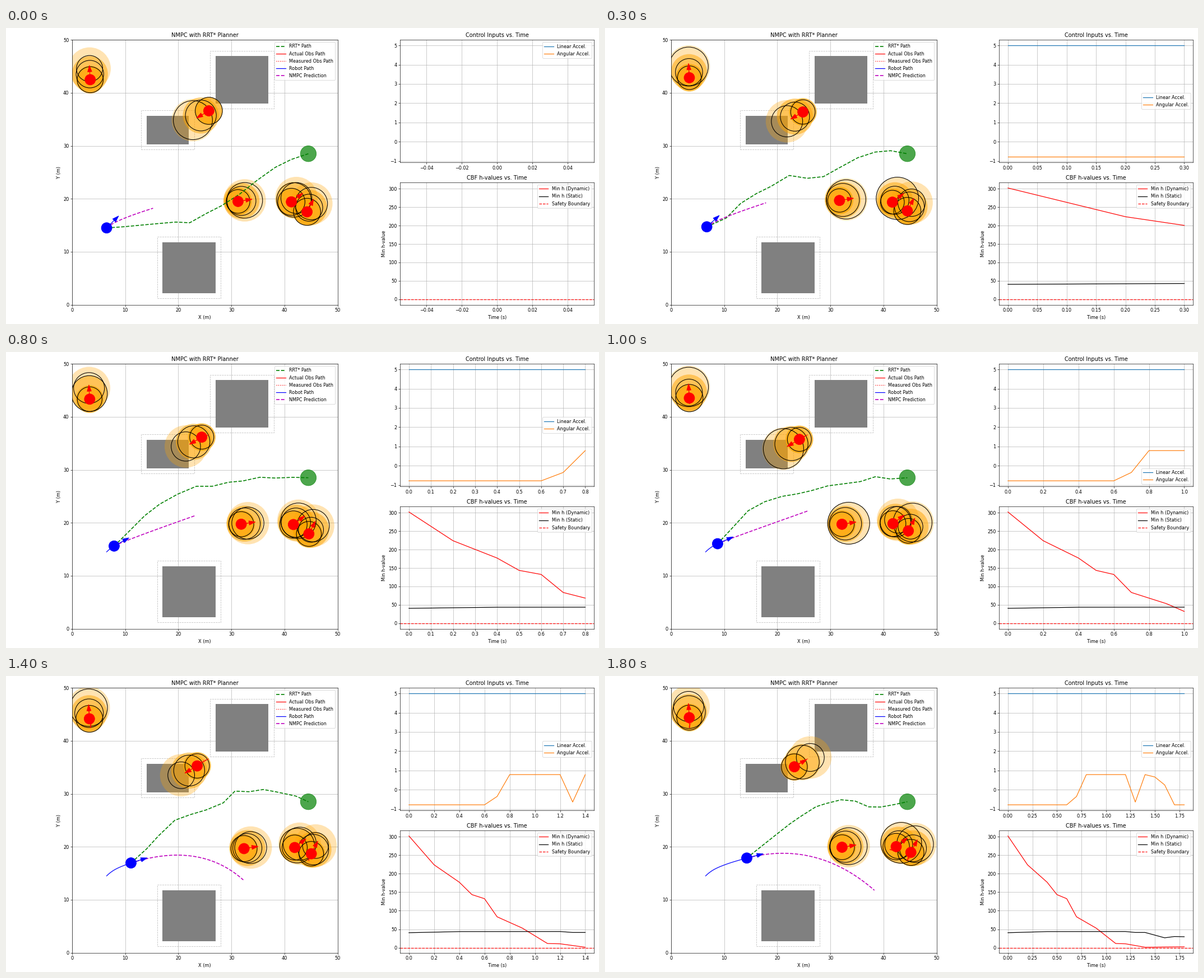
A matplotlib script for the animation above (1.9 s loop, 1058x529 px).

```python
import numpy as np
import matplotlib.pyplot as plt
from matplotlib.animation import FuncAnimation
from matplotlib.patches import Circle, Rectangle

W, H = 1058, 529
DPI = W / 18
STEPS, DT = 19, 0.1
GOAL = np.array([44.5, 28.5])
BOXES = [(27, 38, 10, 8.9), (14, 30.3, 8, 5.4), (17, 2.2, 10, 9.6)]
STEP = np.arange(STEPS)

# Obstacle start positions and velocities; one turns back near a box
START = np.array([(3.5, 42.5), (25.5, 36.5), (31.5, 19.5), (41.4, 19.4), (44.5, 17.5)])
VEL = np.array([(-0.06, 1.05), (-1.5, -0.88), (0.63, 0.1), (0.47, 0.36), (0.4, 0.78)])
TURNER, TURN_STEP = 1, 17
SWERVE_STEP = 13  # from here the prediction curves to the right

# Signals through a few key points
LIN_ACC = np.full(STEPS, 5.0)
ANG_ACC = np.interp(STEP, [6, 7, 8, 12, 13, 14, 15, 16, 17],
                    [-0.785, -0.35, 0.785, 0.785, -0.64, 0.785, 0.66, 0.25, -0.785])
H_DYN = np.interp(STEP, [0, 2, 4, 5, 6, 7, 9, 11, 12, 14, 18],
                  [302, 224, 177, 143.5, 132.5, 83.5, 53, 11.3, 10.5, 1.2, 2.4])
H_STAT = np.interp(STEP, [0, 4, 12, 13, 14, 16, 17, 18],
                   [40.5, 43.5, 43.7, 41.2, 41.2, 26.7, 30.2, 29.6])

# Planner's sideways shift at four points along the way, at a few times
SWAY_STEPS = [0, 2, 5, 8, 12, 16, 18]
SWAY = np.array([(-2.2, -4.6, -3.9, -0.6), (2.8, 3.2, 0.6, 3.2), (2.6, 3.4, 3.1, 3.2),
                 (4.4, 5.7, 4, 2.6), (5.4, 3.1, 3.2, 2.6), (4, 7.6, 9.2, 6.9),
                 (3.2, 4.5, 4.9, 0.8)])


def unit(ang):
    return np.array([np.cos(ang), np.sin(ang)])


def drive():
    """Integrate the robot from its accelerations."""
    pos, ang, speed, turn = np.array([6.5, 14.5]), np.pi / 4, 0.0, 0.0
    out = [(*pos, ang)]
    for k in range(STEPS - 1):
        speed += LIN_ACC[k] * DT
        turn += ANG_ACC[k] * DT
        pos = pos + speed * DT * unit(ang)
        ang += turn * DT
        out.append((*pos, ang))
    return np.array(out)


def obstacle_paths():
    travel = np.tile(STEP[:, None] * DT, (1, len(START)))
    travel[:, TURNER] = (TURN_STEP - abs(TURN_STEP - STEP)) * DT
    return START + VEL * travel[..., None]


robot = drive()
actual = obstacle_paths()
measured = actual + np.random.default_rng(4).normal(0, 0.15, actual.shape)


def planned_route(step):
    """A straight way to the goal, bent by the sway, with small seeded kinks."""
    rng = np.random.default_rng(step)
    u = np.linspace(0, 1, 13)
    sway = [np.interp(step, SWAY_STEPS, col) for col in SWAY.T]
    here = robot[step, :2]
    route = here + u[:, None] * (GOAL - here)
    route[:, 1] += np.interp(u, np.linspace(0, 1, 6), [0, *sway, 0])
    route[1:-1] += rng.normal(0, 0.25, (len(u) - 2, 2))
    return route


def prediction(step):
    """A quadratic curve that leaves along the heading."""
    here, ang = robot[step, :2], robot[step, 2]
    swerve = step >= SWERVE_STEP
    aim = np.radians(11 - 1.4 * step if swerve else 23 - 0.3 * step)
    end = here + (9.5 + 0.85 * step) * unit(aim)
    ctrl = here + (13.6 if swerve else 2) * unit(ang)
    u = np.linspace(0, 1, 40)[:, None]
    return (1 - u) ** 2 * here + 2 * u * (1 - u) * ctrl + u ** 2 * end


fig = plt.figure(figsize=(18, 9), dpi=DPI)


def panel(x, top, w, h):
    return fig.add_axes([x / W, (H - top - h) / H, w / W, h / H])


world = panel(118, 21.1, 473.5, 473.5)
inputs = panel(703.2, 21.2, 346, 219)
safety = panel(703.2, 276, 346, 218.7)


def arrow(pos, ang, length, color):
    world.arrow(*pos, *(length * unit(ang)), head_width=0.8, head_length=1.2,
                fc=color, ec=color, zorder=5)


def disc(pos, r, **style):
    world.add_patch(Circle(pos, r, **style))


def draw_obstacle(i, step):
    rng = np.random.default_rng([step, i])
    pos = measured[step, i]
    vel = -VEL[i] if i == TURNER and step > TURN_STEP else VEL[i]
    # Growing uncertainty, one second further ahead each time
    for ahead, (r, alpha) in enumerate([(2.6, 0.7), (3.4, 0.5), (4.0, 0.3)]):
        spot = pos + ahead * vel
        disc(spot, r, fc="orange", ec="none", alpha=alpha)
        disc(spot, rng.uniform(2.2 + 0.1 * ahead, r), fill=False, ec="black",
             lw=1.3, zorder=1.5)
    for paths, style, label in ((actual, "r-", "Actual Obs Path"),
                                (measured, "r:", "Measured Obs Path")):
        world.plot(*paths[:step + 1, i].T, style, label=label if i == 0 else None)
    disc(pos, 1, color="red", zorder=4)
    arrow(pos, np.arctan2(vel[1], vel[0]), 1.5, "red")


def draw_world(step):
    pos, ang = robot[step, :2], robot[step, 2]
    world.clear()
    for x, y, w, h in BOXES:
        world.add_patch(Rectangle((x, y), w, h, fc="gray", ec="none"))
        world.add_patch(Rectangle((x - 1, y - 1), w + 2, h + 2, fill=False,
                                  ec="gray", ls="--", alpha=0.5))
    world.plot(*planned_route(step).T, "g--", lw=2, label="RRT* Path")
    for i in range(len(START)):
        draw_obstacle(i, step)
    world.plot(*robot[:step + 1, :2].T, "b-", label="Robot Path")
    world.plot(*prediction(step).T, "m--", lw=2, label="NMPC Prediction")
    disc(GOAL, 1.5, color="green", alpha=0.7)
    disc(pos, 1, color="blue", zorder=4)
    arrow(pos, ang, 2, "blue")
    world.set(xlim=(0, 50), ylim=(0, 50), xlabel="X (m)", ylabel="Y (m)",
              title="NMPC with RRT* Planner")
    world.set_axisbelow(True)
    world.grid(True)
    world.legend(loc="upper right")


def draw_charts(step):
    n = step + 1
    t = STEP[:n] * DT
    inputs.clear()
    inputs.plot(t, LIN_ACC[:n], label="Linear Accel.")
    inputs.plot(t, ANG_ACC[:n], label="Angular Accel.")
    inputs.set_title("Control Inputs vs. Time")
    safety.clear()
    safety.plot(t, H_DYN[:n], "r-", label="Min h (Dynamic)")
    safety.plot(t, H_STAT[:n], "k-", label="Min h (Static)")
    safety.axhline(0, color="r", ls="--", label="Safety Boundary")
    safety.set(title="CBF h-values vs. Time", xlabel="Time (s)", ylabel="Min h-value")
    for ax in (inputs, safety):
        ax.grid(True)
        ax.legend(loc="best")


def draw(step):
    draw_world(step)
    draw_charts(step)
    return []


anim = FuncAnimation(fig, draw, frames=STEPS, interval=100, repeat=True)
plt.show()
```
